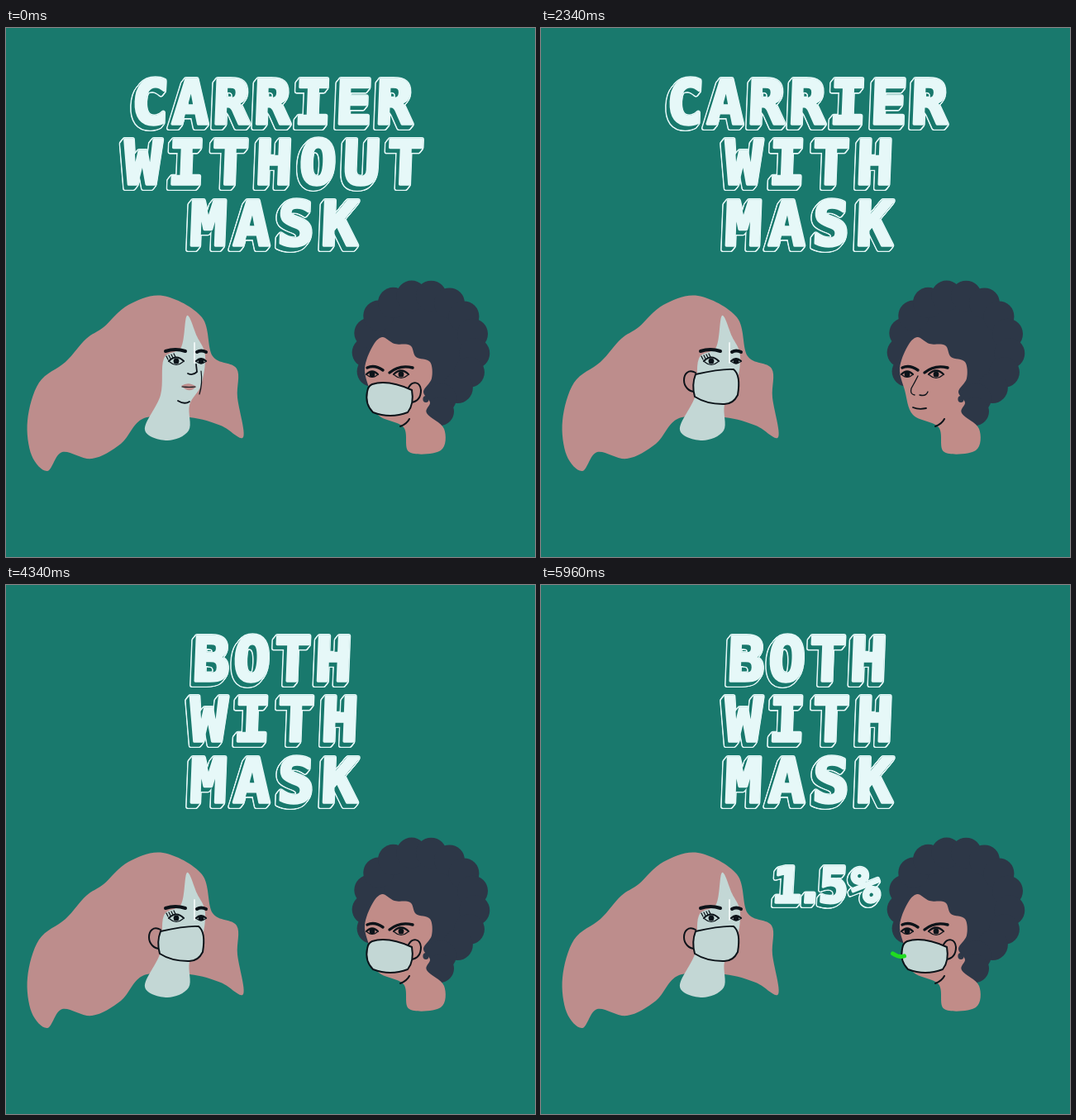
Animation, 640 px wide and 640 px high, one loop 6.06 s. Source, as an HTML page with a canvas:

```html
<!DOCTYPE html>
<html lang="en">
<head>
<meta charset="utf-8">
<title>Mask risk</title>
<style>
html, body { margin: 0; width: 100%; height: 100%; overflow: hidden; background: #19796d; }
canvas { display: block; width: 100%; height: 100%; }
</style>
</head>
<body>
<canvas id="stage" width="640" height="640" role="img"
  aria-label="Carrier without mask 70%. Carrier with mask 5%. Both with mask 1.5%."></canvas>
<script>
const ctx = document.getElementById('stage').getContext('2d');
const BG = '#19796d', CHALK = '#e6f8f8', PINK = '#bd8d8c', PALE = '#c3d7d5';
const NAVY = '#2d3747', SKIN = '#c18c88', INK = '#0c1319', GREEN = '#20dc20';
const SCENE = 2020, LOOP = 3 * SCENE, NUMBER_AT = 500;

// One block letter with a hollow shadow down to the left
function letter(c, x, base, size, slant) {
  const weight = 3.5, depth = size / 14;
  ctx.font = `bold ${size}px "DejaVu Sans Mono", monospace`;
  const pass = (color, width, from) => {
    ctx.fillStyle = ctx.strokeStyle = color;
    ctx.lineWidth = width;
    for (let k = from; k >= 0; k -= 0.5) {
      ctx.setTransform(1, 0, -slant, 1, x - slant * size * 0.36 - k * 0.8, base + k);
      ctx.strokeText(c, 0, 0);
      ctx.fillText(c, 0, 0);
    }
  };
  pass(CHALK, weight + 2.4, depth);
  pass(BG, weight - 0.6, depth);
  pass(CHALK, weight, 0);
  ctx.resetTransform();
}

// Letters on an even pitch, centred on mid; a full stop takes less room
function word(text, mid, base, pitch, size = 74, slant = 0.04) {
  ctx.textAlign = 'center';
  ctx.lineJoin = 'round';
  const room = c => c === '.' ? pitch * 0.45 : pitch;
  let x = mid - [...text].reduce((sum, c) => sum + room(c), 0) / 2;
  for (const c of text) {
    letter(c, x + room(c) / 2, base, size, slant);
    x += room(c);
  }
}

// Smooth closed outline through key points written as "x y, x y"
function blob(points) {
  const p = points.split(',').map(s => s.trim().split(' ').map(Number));
  const path = new Path2D(), at = i => p[(i + p.length) % p.length];
  path.moveTo(...p[0]);
  p.forEach((b, i) => {
    const a = at(i - 1), c = at(i + 1), d = at(i + 2);
    path.bezierCurveTo(b[0] + (c[0] - a[0]) / 6, b[1] + (c[1] - a[1]) / 6,
      c[0] - (d[0] - b[0]) / 6, c[1] - (d[1] - b[1]) / 6, ...c);
  });
  return path;
}

function fill(path, color) {
  ctx.fillStyle = color;
  ctx.fill(path);
}
function line(path, width = 2, color = INK) {
  ctx.strokeStyle = color;
  ctx.lineWidth = width;
  ctx.stroke(typeof path === 'string' ? new Path2D(path) : path);
}
function oval(x, y, rx, ry, color) {
  ctx.beginPath();
  ctx.ellipse(x, y, rx, ry, 0, 0, 7);
  ctx.fillStyle = color;
  ctx.fill();
}
function eye(x, y, r, white) {
  oval(x, y, r, r / 2, white);
  line(`M${x - r} ${y}Q${x} ${y - r} ${x + r} ${y}`, 2.2);
  line(`M${x - r + 1} ${y + 1}Q${x} ${y + r - 1} ${x + r - 1} ${y + 1}`, 1.2);
  oval(x, y, 3.4, 3.6, INK);
}

const longHair = blob('190 324, 148 335, 118 362, 97 376, 72 404, 40 429, 26 475, 31 517, 50 536, ' +
  '68 513, 104 521, 139 503, 167 472, 222 471, 260 481, 287 495, 280 447, 279 412, 250 397, 237 350');
const paleFace = blob('219 348, 231 373, 241 396, 236 432, 222 456, 221 487, 195 499, 168 486, ' +
  '187 444, 191 400, 212 386');
const darkFace = blob('455 374, 470 382, 489 384, 496 398, 513 404, 515 424, 505 440, 513 453, ' +
  '509 466, 530 485, 526 511, 488 513, 481 483, 450 468, 440 438, 434 412, 443 386');
const leftMask = new Path2D('M187 419Q218 412 233 413Q242 420 238 444Q232 456 220 455Q200 455 186 446Q182 432 187 419Z');
const rightMask = new Path2D('M443 431Q462 425 491 438Q494 455 486 465Q465 473 444 465Q434 455 437 440Q438 433 443 431Z');

function mask(shape, loop) {
  line(loop);
  fill(shape, PALE);
  line(shape);
}

function leftWoman(masked) {
  fill(longHair, PINK);
  fill(paleFace, PALE);
  line('M228 381V405', 2, '#edf5f4');
  line('M193 391Q205 387 217 391M231 392Q236 389 242 392', 4);
  eye(206, 403, 9, PALE);
  eye(236, 403, 6, PALE);
  for (let i = 0; i < 4; i++) line(`M${196 + i * 3} ${401 - i}l-2 -4`, 1.2);
  if (masked) {
    mask(leftMask, 'M187 417C178 412 173 419 173 426C173 434 179 440 186 440');
    return;
  }
  line('M230 407L231 416Q226 421 220 418', 1.8);
  fill(new Path2D('M212 433Q221 427 230 434Q222 443 212 433Z'), PINK);
  line('M213 434Q222 435 229 434M236 415Q238 430 234 443', 1.2);
  line('M208 451Q216 456 222 452', 1.8);
}

function rightWoman(masked) {
  oval(502, 388, 66, 66, NAVY);
  for (let deg = -205; deg <= 70; deg += 21) {
    const a = deg * Math.PI / 180;
    oval(502 + 65 * Math.cos(a), 388 + 65 * Math.sin(a), 18.5, 18.5, NAVY);
  }
  oval(525, 464, 17, 17, NAVY);
  fill(darkFace, SKIN);
  oval(508, 449, 3.6, 4, NAVY);
  line('M437 411Q446 407 456 414M464 417Q476 407 492 411', 3.4);
  eye(443, 419, 7, SKIN);
  eye(478, 419, 9, SKIN);
  line('M477 482Q485 479 488 473', 2);
  if (masked) {
    mask(rightMask, 'M487 435C492 426 501 428 502 438C502 447 498 452 490 453');
    return;
  }
  line('M456 421Q452 429 448 436Q446 443 452 444M458 444Q466 446 468 440', 1.3);
  line('M450 459Q457 462 466 460', 1.8);
}

// Breath: each trail is a swing around a middle height
const trails = [
  { from: 275, to: 423, y: 431, swing: 3, crest: 337, length: 52, climb: 0.05 },
  { from: 250, to: 440, y: 443.5, swing: 6, crest: 356, length: 53, climb: 0 },
  { from: 275, to: 423, y: 465, swing: 6.5, crest: 318, length: 82, climb: 0 }
];

function breath(t) {
  const head = 295 + 0.32 * (t - 880), tail = 292 + 0.333 * (t - 1520);
  for (const w of trails) {
    const a = Math.max(w.from, tail), b = Math.min(w.to, head);
    if (a >= b) continue;
    const path = new Path2D();
    for (let x = a; x <= b; x += 1) {
      const d = x - w.crest;
      path.lineTo(x, w.y - w.climb * d - w.swing * Math.cos(2 * Math.PI * d / w.length));
    }
    line(path, 5, GREEN);
  }
}

const scenes = [
  {
    left: false, right: true, top: 'CARRIER', middle: 'WITHOUT',
    number: () => word('7O%', 342, 391, 39, 58, 0.14) // plain round zero
  },
  {
    left: true, right: false, top: 'CARRIER', middle: 'WITH',
    number: () => word('5%', 347, 402, 48, 74, 0.12)
  },
  {
    left: true, right: true, top: 'BOTH', middle: 'WITH',
    number: () => word('1.5%', 345, 384, 38.5, 59, 0.06)
  }
];

function draw(now) {
  const time = now % LOOP, t = time % SCENE;
  const scene = scenes[Math.floor(time / SCENE)];
  ctx.fillStyle = BG;
  ctx.fillRect(0, 0, 640, 640);
  word(scene.top, 322, 116, 49.3);
  word(scene.middle, 324, 189, 53);
  word('MASK', 324, 263, 53);
  ctx.lineCap = ctx.lineJoin = 'round';
  leftWoman(scene.left);
  rightWoman(scene.right);
  if (t >= NUMBER_AT) scene.number();
  breath(t);
}

const start = performance.now();
function tick() {
  draw(performance.now() - start);
  requestAnimationFrame(tick);
}
tick();
</script>
</body>
</html>
```
